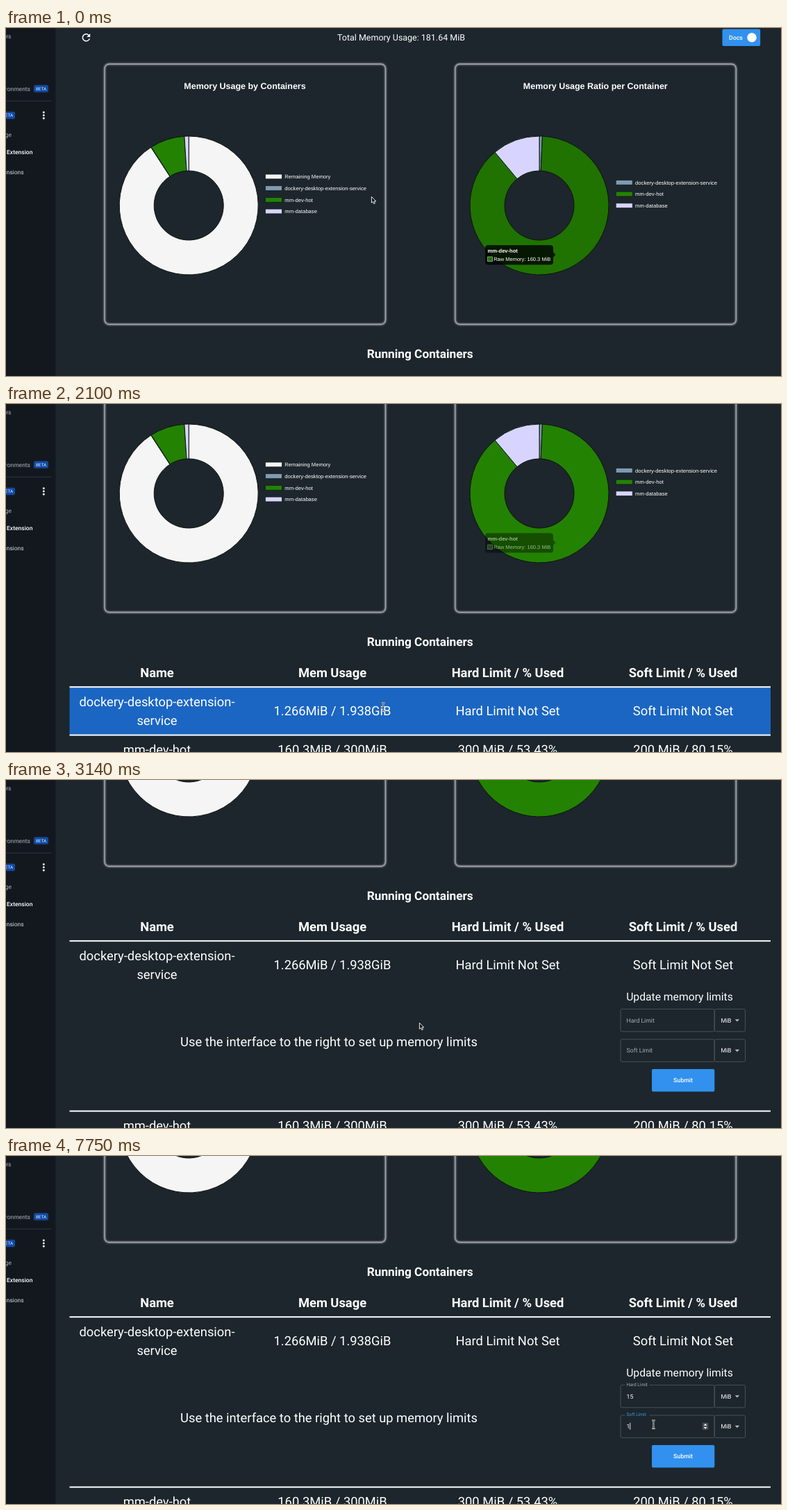
Recreate the animation shown at these times as an HTML page. Size 1116x502 px, loop 8000 ms.

```html
<!DOCTYPE html>
<html lang="en">
<head>
<meta charset="utf-8">
<title>Memory usage dashboard</title>
<style>
html, body { margin: 0; width: 100%; height: 100%; overflow: hidden; background: #1c262c; }
svg { display: block; width: 100vw; height: 100vh; }
text { font-family: Roboto, sans-serif; text-rendering: geometricPrecision; }
.chart { font-family: "Liberation Sans", Arial, sans-serif; }
</style>
</head>
<body>
<svg id="stage" viewBox="0 0 1116 502"></svg>
<script>
const LOOP = 8000;
const EXPAND = 176;
const stage = document.getElementById('stage');

// ---- markup helpers; text is placed by the centre of its capitals ----
const text = (x, y, size, str, { fill = '#fff', anchor = 'start', weight = 400, cls = '', id = '' } = {}) =>
  `<text ${id && `id="${id}"`} class="${cls}" x="${x}" y="${(y + size * 0.357).toFixed(2)}" font-size="${size}" ` +
  `font-weight="${weight}" fill="${fill}" text-anchor="${anchor}">${str}</text>`;
const mid = (x, y, size, str, opt) => text(x, y, size, str, { anchor: 'middle', ...opt });
const rect = (x, y, w, h, fill, more = '') =>
  `<rect x="${x}" y="${y}" width="${w}" height="${h}" fill="${fill}" ${more}/>`;
const group = (id, body) => `<g id="${id}">${body}</g>`;

const WHITE = '#f5f5f5', SLATE = '#7f9bb1', GREEN = '#248202', HOT = '#207300', LILAC = '#d7d5ff';
const BLUE = '#3291ee';

// ---- charts ----
function slice(cx, cy, from, to, fill, id) {
  const p = (deg, r) => {
    const a = deg * Math.PI / 180;
    return `${(cx + r * Math.sin(a)).toFixed(2)} ${(cy - r * Math.cos(a)).toFixed(2)}`;
  };
  const big = to - from > 180 ? 1 : 0;
  return `<path ${id ? `id="${id}"` : ''} d="M${p(from, 100)}A100 100 0 ${big} 1 ${p(to, 100)}L${p(to, 50)}` +
    `A50 50 0 ${big} 0 ${p(from, 50)}Z" fill="${fill}" stroke="#0d140f" stroke-width="1" stroke-linejoin="bevel"/>`;
}

function card(x, title, parts, legendY, hotId) {
  const total = parts.reduce((sum, p) => sum + p[1], 0);
  const frame = `x="${x}" y="52" width="404.5" height="375.5" rx="6.5" fill="none"`;
  let out = `<rect ${frame} stroke="#b4b8bb" stroke-width="3" opacity=".6" style="filter:blur(1.3px)"/>` +
    `<rect ${frame} stroke="#a3a8ac" stroke-width="1.3"/>` +
    mid(x + 202, 83.7, 12.48, title, { weight: 700, cls: 'chart' });
  let angle = 0;
  parts.forEach(([name, size, fill], i) => {
    const next = angle + size / total * 360;
    const y = legendY + i * 16.7;
    out += slice(x + 121.2, 256, angle, next, fill, name === 'mm-dev-hot' && hotId) +
      rect(x + 231.4, y - 3.4, 24, 6.8, fill, 'stroke="#10181a" stroke-width=".7"') +
      text(x + 259.3, y, 7.63, name, { cls: 'chart' });
    angle = next;
  });
  return out;
}

const used = [
  ['dockery-desktop-extension-service', 1.266, SLATE],
  ['mm-dev-hot', 160.3, GREEN],
  ['mm-database', 20.07, LILAC],
];

const tooltip = group('tip',
  rect(690, 313.2, 98, 28.4, '#000', 'rx="4" fill-opacity=".8"') +
  '<path d="M788 323l3.2 4-3.2 4z" fill-opacity=".8"/>' +
  text(693.6, 321, 7.55, 'mm-dev-hot', { weight: 700, cls: 'chart' }) +
  rect(693.7, 330, 6.8, 6.8, HOT, 'stroke="#cfd8cc" stroke-width=".6"') +
  text(702.2, 333.2, 7.5, 'Raw Memory: 160.3 MiB', { cls: 'chart' }));

const header =
  '<path transform="translate(106.8 5.1) scale(.72)" fill="#fff" d="M17.65 6.35C16.2 4.9 14.21 4 12 4c-4.42 0-7.99 3.58-7.99 8s3.57 8 7.99 8c3.73 0 6.84-2.55 7.73-6h-2.08c-.82 2.33-3.04 4-5.65 4-3.31 0-6-2.69-6-6s2.69-6 6-6c1.66 0 3.14.69 4.22 1.78L13 11h7V4z"/>' +
  mid(569, 13.8, 12.48, 'Total Memory Usage: 181.64 MiB') +
  rect(1031.5, 1.5, 54.7, 24.4, BLUE, 'rx="2"') +
  text(1041, 13.8, 8.75, 'Docs', { weight: 500 }) +
  '<circle cx="1074" cy="13.8" r="6.8" fill="#fff"/>';

// ---- table ----
const COLS = [217.5, 470, 722.5, 975];
const cells = (y, list, weight) => list.map((s, i) => s && mid(COLS[i], y, 18.33, s, { weight })).join('');
const rule = y => rect(91.5, y - 1, 1009.5, 2, '#fff');

const table =
  mid(596.2, 470, 17.25, 'Running Containers', { weight: 700 }) +
  cells(514.8, ['Name', 'Mem Usage', 'Hard Limit / % Used', 'Soft Limit / % Used'], 700) +
  rect(91.5, 536, 1009.5, 68, '#1b66c3', 'id="hover"') +
  rule(535.2) +
  cells(569.6, ['', '1.266MiB / 1.938GiB', 'Hard Limit Not Set', 'Soft Limit Not Set']) +
  mid(COLS[0], 556, 18.33, 'dockery-desktop-extension-') +
  mid(COLS[0], 583.5, 18.33, 'service') +
  group('rest', rule(604.6) +
    cells(625.2, ['mm-dev-hot', '160.3MiB / 300MiB', '300 MiB / 53.43%', '200 MiB / 80.15%']));

// ---- limits form ----
function field(id, y, label) {
  const box = (x, w) => rect(x, y - 16, w, 32.4, 'none', 'rx="2" stroke="#465058" stroke-width="1"');
  return box(885, 135) + box(1020.5, 44) +
    rect(891.5, y - 17.5, 35, 3, '#1c262c', `id="${id}Notch"`) +
    text(0, 0, 8.7, label, { id: id + 'Label' }) +
    text(893.6, y + 0.2, 8.7, '', { id: id + 'Value' }) +
    rect(0, y - 5.2, 0.9, 10, '#fff', `id="${id}Caret"`) +
    group(id + 'Spin', rect(1002.8, y - 5.2, 8.6, 10.2, '#4a4d50', 'rx="1"') +
      `<path d="M1004.8 ${y - 1.2}l2.3-2.8 2.3 2.8zM1004.8 ${y + 1}h4.6l-2.3 2.8z" fill="#fff"/>`) +
    text(1029.4, y + 0.2, 8.7, 'MiB') +
    `<path d="M1049.6 ${y - 1.2}h6.6l-3.3 3.4z" fill="#b6bcc1"/>`;
}

const form = group('form',
  mid(970, 615.6, 15.7, 'Update memory limits') +
  mid(465, 680.7, 18.33, 'Use the interface to the right to set up memory limits') +
  field('hard', 649.4, 'Hard Limit') +
  field('soft', 693, 'Soft Limit') +
  rect(930, 720, 90.3, 32.4, BLUE, 'rx="2"') +
  mid(975, 736.1, 8.75, 'Submit', { weight: 500 }));

// ---- sidebar ----
const GREY = '#a9b1b8';
const side = (x, y, str, opt) => text(x, y, 8.5, str, { anchor: 'end', fill: GREY, ...opt });
const chip = x => rect(x, x < 0 ? 120.8 : 82.3, 21, 10.4, '#1249a0', 'rx="2"') +
  mid(x + 10.5, x < 0 ? 126 : 87.5, 6.3, 'BETA', { fill: '#b5d4fb', weight: 500 });
const sidebar = rect(0, 0, 71.5, 502, '#13181f') +
  side(7.5, 12, 'rs') + side(35, 87.5, 'ronments') + side(8, 154, 'ge') +
  side(38.4, 179.2, 'Extension', { fill: '#fff', weight: 500 }) +
  side(25.6, 208.4, 'nsions', { fill: '#d5dade' }) +
  chip(40) + chip(-8) + rect(0, 104.8, 66, 1, '#2a3239') +
  [121.8, 126, 130.2].map(y => `<circle cx="54.3" cy="${y}" r="1.45" fill="#fff"/>`).join('');

// ---- pointers ----
const beam = 'M-2.4-6Q0-6 0-4.4Q0-6 2.4-6M0-4.4V4.4M-2.4 6Q0 6 0 4.4Q0 6 2.4 6M-1.4 1.5H1.4';
const pointers =
  group('arrow', '<path d="M.4.4V9.2L2.4 7.4 3.8 10.6 5.4 9.9 4 6.9H6.8Z" fill="#111" stroke="#fff" stroke-width=".9" stroke-linejoin="round"/>') +
  group('beam', `<path d="${beam}" fill="none" stroke="#dfe2e4" stroke-width="2"/>` +
    `<path d="${beam}" fill="none" stroke="#1a1a1a" stroke-width=".7"/>`);

stage.innerHTML =
  group('page', header +
    card(142, 'Memory Usage by Containers', [['Remaining Memory', 1802.9, WHITE], ...used], 214.4) +
    card(646.8, 'Memory Usage Ratio per Container', used, 222.8, 'hot') +
    tooltip + table + form) + sidebar + pointers;

const el = {};
stage.querySelectorAll('[id]').forEach(n => { el[n.id] = n; });

// ---- timeline: every value holds until the next key ----
const hold = (keys, t) => keys.reduce((now, key) => key[0] <= t ? key : now, keys[0]);
const show = (id, on) => el[id].setAttribute('visibility', on ? 'visible' : 'hidden');
const move = (id, x, y) => el[id].setAttribute('transform', `translate(${x} ${y})`);

const SCROLL = [[0, 0], [1200, 73], [1350, 112], [1500, 127], [2990, 235], [3140, 303]];
const FADE = [[0, 1], [2100, 0.5], [2250, 0.15], [2400, 0]];
const POINTER = [
  [0, 526, 243], [300, 534, 237], [450, 538, 234],
  [1650, 540, 268], [1800, 542, 345], [1950, 543, 415], [2100, 543.3, 437],
  [2700, 572, 385], [2840, 590, 361.5], [2990, 594, 352], [3140, 595, 350],
  [3430, 625, 354], [3580, 690, 364], [3730, 768, 374], [3880, 835, 372],
  [4020, 872, 366], [4170, 886, 362], [4320, 889, 361],
  [4610, 906, 358], [4760, 911.4, 357.5],
  [6850, 918, 368], [7000, 929, 383], [7150, 932.4, 387.2],
];

function drawField(id, y, t, o) {
  const k = hold([[0, 0], [o.focus, 0.55], [o.focus + 150, 1]], t)[1];
  const focused = t >= o.focus && t < o.blur;
  const value = t >= o.type ? o.value : '';
  const size = 8.7 - 2.15 * k;
  const label = el[id + 'Label'];
  label.setAttribute('font-size', size);
  label.setAttribute('x', 893.6);
  label.setAttribute('y', y - 17 * k + size * 0.357);
  label.setAttribute('fill', focused ? '#3f97ec' : '#a7afb6');
  show(id + 'Notch', k === 1);
  el[id + 'Value'].textContent = value;
  const blinkOn = t >= o.type || Math.floor((t - o.focus) / 450) % 2 === 0;
  el[id + 'Caret'].setAttribute('x', 893.4 + value.length * 4.95);
  show(id + 'Caret', focused && blinkOn);
  show(id + 'Spin', t >= o.hover && t < o.blur);
}

function draw(t) {
  const open = t >= 2400;
  const fade = hold(FADE, t)[1];
  move('page', 0, -hold(SCROLL, t)[1]);
  move('rest', 0, open ? EXPAND : 0);
  el.form.setAttribute('display', open ? 'inline' : 'none');
  show('hover', t >= 1950 && t < 2700);
  el.tip.setAttribute('opacity', fade);
  el.hot.setAttribute('fill', fade === 1 ? HOT : GREEN);

  drawField('hard', 649.4, t, { hover: 4610, focus: 5060, blur: 7150, type: 6250, value: '15' });
  drawField('soft', 693, t, { hover: 7000, focus: 7150, blur: LOOP, type: 7750, value: '1' });

  const [, x, y] = hold(POINTER, t);
  const isBeam = (t >= 2100 && t < 2700) || (t >= 4610 && t < 6850) || t >= 7000;
  move('arrow', x, y);
  move('beam', x, y);
  show('arrow', !isBeam);
  show('beam', isBeam);
}

const start = performance.now();
function tick() {
  draw((performance.now() - start) % LOOP);
  requestAnimationFrame(tick);
}
tick();
</script>
</body>
</html>
```
